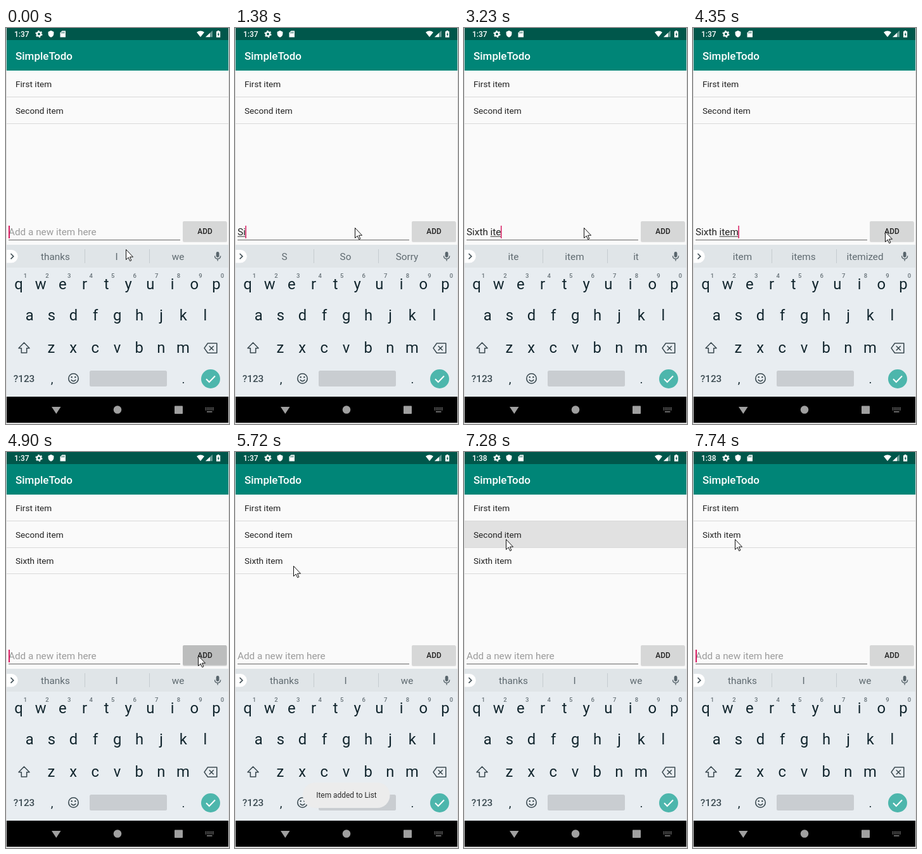
An HTML page that plays this animation: 352x623 px, repeating every 8 s.

```html
<!DOCTYPE html>
<html lang="en">
<head>
<meta charset="utf-8">
<title>Todo list</title>
<style>
html, body { margin: 0; width: 100%; height: 100%; overflow: hidden; background: #dcdcdc; }
svg { display: block; width: 352px; height: 623px; font-family: Roboto, sans-serif; }
text { white-space: pre; }
.mid { text-anchor: middle; }
.row { font-size: 13.63px; fill: #222; }
.edit { font-size: 15.3px; }
.word { font-size: 15.3px; fill: #5f6a70; }
.key { font-size: 23.8px; fill: #12262e; }
.hint { font-size: 9.5px; font-weight: 500; fill: #667177; }
.line { fill: none; stroke: #3c4b52; stroke-width: 1.6; }
</style>
</head>
<body>
<svg viewBox="0 0 352 623">
  <rect x="1" width="350" height="341" fill="#fafafa"/>
  <rect x="1" width="350" height="19" fill="#00574b"/>
  <rect x="1" y="19" width="350" height="48" fill="#008577"/>
  <text x="15" y="50" font-size="17" font-weight="500" fill="#fff">SimpleTodo</text>

  <g id="status" fill="#fff">
    <text id="clock" x="13" y="14" font-size="12" font-weight="500"></text>
    <circle cx="52" cy="9.5" r="3.1" fill="none" stroke="#fff" stroke-width="2.4"/>
    <circle cx="52" cy="9.5" r="4.8" fill="none" stroke="#fff" stroke-width="1.5" stroke-dasharray="2.5 2.53"/>
    <path d="M71 4l4.4 1.9v3.2q0 4-4.4 5.6-4.4-1.6-4.4-5.6V5.900z"/>
    <path d="M88.500 4.500H94v10h-8.500V7.500z"/>
    <path d="M87.800 6.500v2M89.800 6v2.500M91.800 6v2.500" stroke="#00574b" stroke-width=".9"/>
    <path d="M301 6.800q6-4.600 12 0L307 14.300z"/>
    <path d="M315 14.300h11V4z" fill-opacity=".4"/>
    <path d="M315 14.300h7V7.700z"/>
    <path d="M332 5.300h1.800V4h2.600v1.300h1.800v9.400H332z"/>
    <path d="M335.700 6.800l-2 3.600h1.200v2.800l2-3.800h-1.200z" fill="#00574b"/>
  </g>

  <rect id="press" x="1" y="109" width="350" height="41"/>
  <g id="rows"></g>

  <rect x="4" y="333" width="271" height="1" fill="#666"/>
  <text id="entry" class="edit" x="4" y="326"></text>
  <rect id="compose" y="327.500" height="1" fill="#333"/>
  <rect id="caret" y="311" height="20" fill="#d81b60"/>
  <rect x="279" y="305" width="70" height="32" rx="2" fill="#000" opacity=".12"/>
  <rect id="button" x="279" y="304" width="69.500" height="31.500" rx="2"/>
  <text class="mid" x="314" y="324.300" font-size="11.900" font-weight="500" fill="#222">ADD</text>

  <rect x="1" y="341" width="350" height="36.500" fill="#e0e5e8"/>
  <rect x="1" y="377" width="350" height="203" fill="#e8edf1"/>
  <path d="M1 349h7.500a10 10 0 0 1 0 20.500H1z" fill="#fff"/>
  <path d="M7.500 355l4.300 4.200-4.300 4.200" class="line" stroke-width="1.800"/>
  <path d="M124.500 348v22M226.500 348v22" stroke="#c6ccd0"/>
  <g id="words"></g>
  <rect x="331.700" y="352" width="4.800" height="9" rx="2.400" fill="#58656c"/>
  <path d="M329.500 358.500q.2 4.700 4.600 4.700t4.600-4.700M334.100 363v3.500" class="line" style="stroke:#58656c;stroke-width:1.400"/>

  <g id="keys"></g>
  <path d="M28.500 495l8.500 8.700h-4.300v7.300h-8.400v-7.300H20z" class="line" stroke-linejoin="round"/>
  <path d="M318.500 496h14.300v15.300h-14.300l-5.500-7.700zM320.800 500.200l7 7m0-7l-7 7" class="line" stroke-linejoin="round"/>
  <text class="mid" x="28.500" y="557" font-size="15.300" fill="#3c4b52" font-weight="500">?123</text>
  <text class="key mid" x="72.500" y="558.500" style="font-size:19px">,</text>
  <text class="key mid" x="280" y="558.500" style="font-size:19px">.</text>
  <circle cx="106.500" cy="551.500" r="7.700" class="line"/>
  <circle cx="103.700" cy="549.300" r="1.200" fill="#3c4b52"/>
  <circle cx="109.300" cy="549.300" r="1.200" fill="#3c4b52"/>
  <path d="M102.700 553.300q3.800 4.600 7.600 0" class="line"/>
  <rect x="132" y="539" width="122" height="25" rx="2.500" fill="#c9cdd1"/>
  <circle cx="323" cy="552" r="15" fill="#4db6ac"/>
  <path d="M316 552.300l4.800 4.700 9.200-9.500" fill="none" stroke="#fff" stroke-width="2"/>

  <g id="toast">
    <rect x="107" y="520" width="137.500" height="40" rx="20" fill="#ececec"/>
    <text class="mid" x="176" y="544" font-size="11.900" fill="#2d2d2d">Item added to List</text>
  </g>

  <rect x="1" y="580" width="350" height="41"/>
  <g fill="#a0a0a0">
    <path d="M72 596h14.500l-7.200 11z"/>
    <circle cx="176" cy="600.500" r="6.300"/>
    <rect x="266" y="594.500" width="13" height="12.500" rx=".8"/>
    <path d="M314.500 598h13.500M314.500 600.700h13.500" fill="none" stroke="#a0a0a0" stroke-width="1.300" stroke-dasharray="1.400 1"/>
    <path d="M317 603.800h8.500" stroke="#a0a0a0" stroke-width="1.300"/>
  </g>

  <path id="mouse" d="M.5.5V16.500L4.200 13l2.500 5.600 2.200-1-2.400-5.400h5z" fill="#fff" stroke="#111" stroke-width="1"/>
</svg>
<script>
const LOOP = 8000;
const $ = id => document.getElementById(id);
const pen = document.createElement('canvas').getContext('2d');
const textWidth = s => {
  pen.font = '15.3px Roboto, sans-serif';
  return pen.measureText(s).width;
};

function label(parent, cls, x, y, content = '') {
  const el = document.createElementNS('http://www.w3.org/2000/svg', 'text');
  el.setAttribute('class', cls);
  el.setAttribute('x', x);
  el.setAttribute('y', y);
  el.textContent = content;
  return parent.appendChild(el);
}

[['qwertyuiop', 20, 410.5], ['asdfghjkl', 37.2, 460.3], ['zxcvbnm', 71.5, 510.5]]
  .forEach(([letters, x, y]) => [...letters].forEach((c, i) =>
    label($('keys'), 'key mid', x + i * 34.65, y, c)));
for (let i = 0; i < 10; i++) label($('keys'), 'hint mid', 30.5 + i * 34.55, 393, (i + 1) % 10);

const words = [78, 174.5, 271.5].map(x => label($('words'), 'word mid', x, 364.5));
const rows = [0, 1, 2].map(i => {
  const g = document.createElementNS('http://www.w3.org/2000/svg', 'g');
  const y = 67 + i * 41.6;
  g.innerHTML = `<rect x="1" y="${Math.round(y + 41)}" width="350" height="1" fill="#d9d9d9"/>`;
  $('rows').append(g);
  return { g, text: label(g, 'row', 15, y + 26) };
});

const idle = ['thanks', 'I', 'we'];
const start = {
  clock: '1:37', items: ['First item', 'Second item'], entry: '', composing: '',
  words: idle, caret: 1, mouse: [189, 348], button: '#d6d7d7', press: 0, toast: 0
};
const type = (entry, composing, list) => ({ entry, composing, words: list, caret: 1 });

// Each step overrides part of the state before it.
const steps = [
  [140, { mouse: [189, 344], caret: 0 }],
  [270, { mouse: [189, 336] }],
  [400, { mouse: [189, 326] }],
  [540, { mouse: [189, 318] }],
  [670, { mouse: [189, 314], caret: 1 }],
  [950, type('S', 'S', ['S', 'So', 'Sorry'])],
  [1380, type('Si', 'Si', ['S', 'So', 'Sorry'])],
  [1500, { words: ['Si', 'Six', 'Since'] }],
  [1650, type('Six', 'Six', ['Six', 'Sixth', 'Sixty'])],
  [1960, type('Sixth', 'Sixth', ['Sixth', 'Sixths', 'Sixty'])],
  [2390, type('Sixth ', '', ['and', 'grade', 'sense'])],
  [2950, type('Sixth i', 'i', ['i', 'in', 'is'])],
  [3090, type('Sixth it', 'it', ['it', 'item', 'its'])],
  [3230, type('Sixth ite', 'ite', ['ite', 'item', 'it'])],
  [3380, type('Sixth item', 'item', ['item', 'items', 'itemized'])],
  [3810, { mouse: [194, 318], caret: 0 }],
  [3950, { mouse: [222, 328] }],
  [4080, { mouse: [262, 332] }],
  [4220, { mouse: [292, 327] }],
  [4350, { mouse: [303, 320], caret: 1 }],
  [4630, { button: '#c4c5c5' }],
  [4770, { ...type('', '', idle), items: ['First item', 'Second item', 'Sixth item'], button: '#bcbdbd' }],
  [4910, { toast: .5, button: '#cbcccc' }],
  [5050, { toast: 1, button: '#d6d7d7' }],
  [5180, { mouse: [296, 305] }],
  [5320, { mouse: [271, 260], caret: 0 }],
  [5460, { mouse: [188, 208] }],
  [5600, { mouse: [122, 188] }],
  [5720, { mouse: [92, 179] }],
  [5870, { mouse: [74, 149], caret: 1 }],
  [6020, { mouse: [66, 137], clock: '1:38' }],
  [6300, { caret: 0 }],
  [6860, { caret: 1, toast: .9 }],
  [7010, { toast: .6 }],
  [7140, { toast: .2, press: .05 }],
  [7280, { toast: 0, press: .1, caret: 0 }],
  [7590, { items: ['First item', 'Sixth item'], press: 0 }],
  [7740, { caret: 1 }]
];

const set = (id, attrs) => Object.entries(attrs).forEach(([k, v]) => $(id).setAttribute(k, v));

function draw(t) {
  const s = Object.assign({}, start, ...steps.filter(([at]) => at <= t).map(step => step[1]));
  $('clock').textContent = s.clock;
  rows.forEach(({ g, text }, i) => {
    g.style.display = s.items[i] ? '' : 'none';
    text.textContent = s.items[i] || '';
  });
  words.forEach((el, i) => el.textContent = s.words[i]);
  $('entry').textContent = s.entry || 'Add a new item here';
  set('entry', { fill: s.entry ? '#222' : '#9b9b9b' });
  const end = 4 + textWidth(s.entry);
  const mark = textWidth(s.composing);
  set('compose', { x: end - mark, width: mark });
  set('caret', { x: s.entry ? end - .5 : 4, width: s.entry ? 1.5 : 2, opacity: s.caret });
  set('button', { fill: s.button });
  set('press', { opacity: s.press });
  set('toast', { opacity: s.toast });
  set('mouse', { transform: `translate(${s.mouse})` });
}

const begin = performance.now();
function tick() {
  draw((performance.now() - begin) % LOOP);
  requestAnimationFrame(tick);
}
draw(0);
requestAnimationFrame(tick);
</script>
</body>
</html>
```
